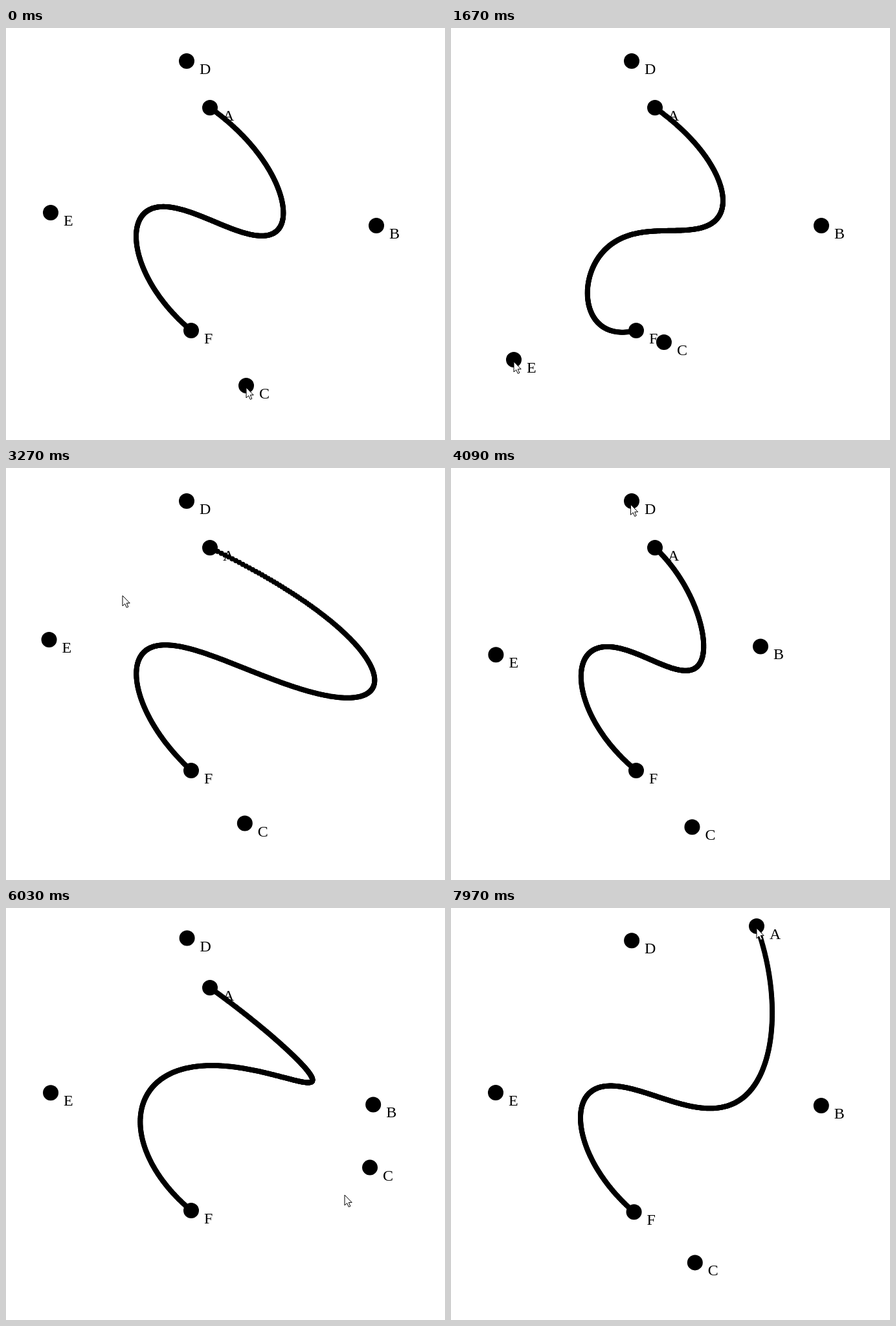
An HTML page with a canvas for the animation above (8000 ms loop, 678x636 px).

```html
<!DOCTYPE html>
<html>
<head>
<meta charset="utf-8">
<style>
html, body { margin: 0; width: 678px; height: 636px; overflow: hidden; background: #fff; }
canvas { display: block; }
</style>
</head>
<body>
<canvas id="stage" width="678" height="636"></canvas>
<script>
const ctx = document.getElementById('stage').getContext('2d');
const LOOP = 8000, FPS = 30, TICKS = 240;
const DAMPING = 0.0513, SWING = 80.2;   // spring decay and degrees turned per tick
const GRIP = 3;                         // the pointer holds a point slightly below its centre

const homes = { A: [315, 123], B: [572, 305], C: [371, 552], D: [279, 51], E: [69, 285], F: [286, 467] };

// Each point is pulled away by dx, dy, held, then let go to spring home
const drags = [
  { name: 'C', grab: 3, release: 22.8, dx: -276, dy: -439, swing: 77.5 },
  { name: 'E', grab: 36, release: 54.9, dx: 28, dy: 227 },
  { name: 'B', grab: 70, release: 95.88, dx: -391, dy: -123 },
  { name: 'D', grab: 125, release: 137.36, dx: -33, dy: 241 },
  { name: 'C', grab: 160, release: 180.7, dx: 212, dy: -168, swing: 79.3 },
  { name: 'F', grab: 198, release: 219.9, dx: 287, dy: -191 },
  { name: 'A', grab: 230, release: TICKS, dx: 157, dy: -95 }
];

// Pointer stops besides the drags: tick, x, y
const stops = [[33, 85, 311], [44, 528, 420], [66, 545, 310], [98, 180, 197], [147, 247, 293], [181, 523, 443]];

const path = drags.flatMap(({ name, grab, release, dx, dy }) => {
  const [x, y] = homes[name];
  const at = (k, s) => [k, x + dx * s, y + dy * s + GRIP];
  return [at(grab, 0), at(grab + 0.7 * (release - grab), 1), at(release, 1)];
}).concat(stops).sort((a, b) => a[0] - b[0]);

function pointer(k) {
  const i = path.findIndex(p => p[0] >= k);
  const [k1, x1, y1] = path[i], [k0, x0, y0] = path[i - 1] || [k1 - 1, x1, y1];
  const u = (k - k0) / (k1 - k0), s = i ? u * u * (3 - 2 * u) : 0;
  return [x0 + (x1 - x0) * s, y0 + (y1 - y0) * s];
}

function pose(k) {
  const pts = { ...homes };
  for (const { name, grab, release, dx, dy, swing = SWING } of drags) {
    if (k < grab) continue;
    const [x, y] = homes[name];
    if (k <= release) {
      const [px, py] = pointer(k);
      pts[name] = [px, py - GRIP];
    } else {
      const n = k - release;
      const s = Math.exp(-DAMPING * n) * Math.cos(n * swing * Math.PI / 180);
      pts[name] = [x + dx * s, y + dy * s];
    }
  }
  return pts;
}

function dot(x, y, r) {
  ctx.beginPath();
  ctx.arc(x, y, r, 0, 7);
  ctx.fill();
}

const mix = (a, b, t) => a + (b - a) * t;

// De Casteljau: blend neighbours until one point is left
function bezier(pts, t) {
  while (pts.length > 1) {
    pts = pts.slice(1).map((p, i) => p.map((v, j) => mix(pts[i][j], v, t)));
  }
  return pts[0];
}

function drawPointer([x, y]) {
  ctx.save();
  ctx.translate(x, y);
  const arrow = new Path2D('M0 0V16L3.7 12.6 6.3 18.4 8.8 17.3 6.3 11.6H11.2Z');
  ctx.fillStyle = '#fff';
  ctx.fill(arrow);
  ctx.stroke(arrow);
  ctx.restore();
}

function draw(ms) {
  const k = Math.min(TICKS - 1, Math.floor((ms + 22) * FPS / 1000));
  const pts = pose(k);
  ctx.fillStyle = '#fff';
  ctx.fillRect(0, 0, 678, 636);
  ctx.fillStyle = '#000';
  ctx.font = '24px "Liberation Serif", "Times New Roman", serif';
  for (let i = 0; i <= 500; i++) dot(...bezier(Object.values(pts), i / 500), 4);
  for (const name in pts) {
    const [x, y] = pts[name];
    dot(x, y, 12);
    ctx.fillText(name, x + 20, y + 20);
  }
  drawPointer(pointer(k));
}

const start = performance.now();
function tick() {
  draw((performance.now() - start) % LOOP);
  requestAnimationFrame(tick);
}
tick();
</script>
</body>
</html>
```
